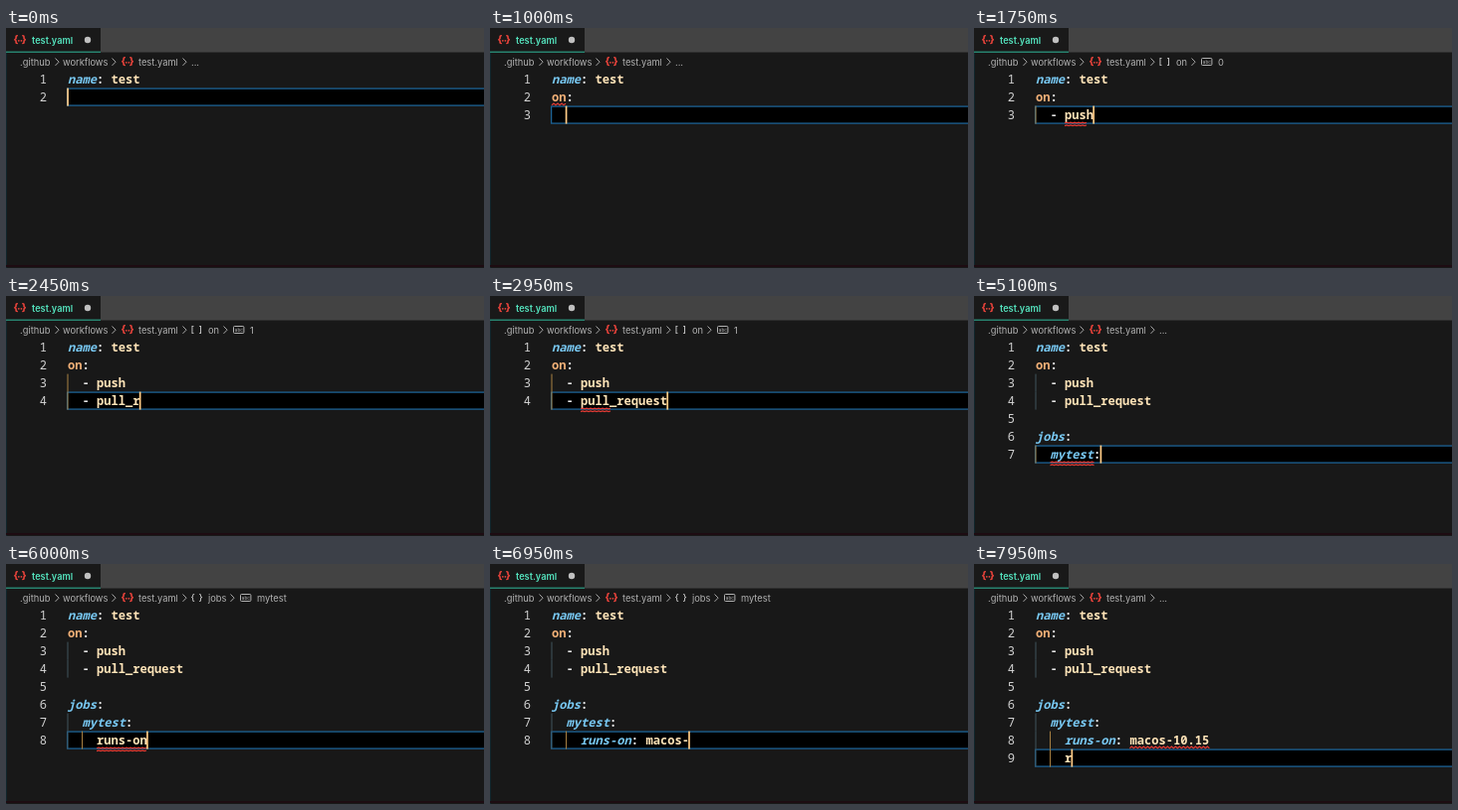
Write an HTML page that moves like this. It is 480 px wide and 242 px high and loops after 8000 ms.

```html
<!DOCTYPE html>
<html lang="en">
<head>
<meta charset="utf-8">
<title>Typing a workflow file</title>
<style>
  html, body { margin: 0; width: 100%; height: 100%; overflow: hidden; background: #181818; }
  svg { display: block; width: 100vw; height: 100vh; }
  text { white-space: pre; }
  .code { font: 600 12.1px "Noto Sans Mono", monospace; }
  .ui { font: 9.3px Inter, sans-serif; fill: #b2b2b2; }
  .tab { font: 600 9.2px Inter, sans-serif; fill: #55e6c0; }
  .bracket { font: 500 9.6px Inter, sans-serif; fill: #c4c4c4; }
  .icon { font: 800 10px Inter, sans-serif; fill: #e8433b; }
  .key { font-style: italic; fill: #78c8f2; }
  .bool { fill: #f2b077; }
  .value { fill: #ffe4b8; }
  .mark { fill: #e8e8e8; }
  .number { font-weight: 500; fill: #d2d2d2; text-anchor: end; }
  .chevron, .wave, .box { fill: none; }
  .chevron { stroke: #a8a8a8; stroke-width: 1; }
  .wave { stroke: #e23b35; stroke-width: 1.2; }
  .box { stroke: #b2b2b2; stroke-width: 1; }
</style>
</head>
<body>
<svg viewBox="0 0 480 242">
  <rect width="480" height="242" fill="#181818"/>
  <rect width="480" height="24.5" fill="#434343"/>
  <rect width="95" height="24.5" fill="#191919"/>
  <rect y="23.6" width="95" height="1.2" fill="#2a9c83"/>
  <rect y="25" width="1" height="217" fill="#10252b"/>
  <rect y="239" width="480" height="2" fill="#1d0c12"/>
  <text class="tab" x="26" y="15.6">test.yaml</text>
  <circle cx="82" cy="12" r="3.2" fill="#c0c0c0"/>
  <g id="crumbs"></g>
  <g id="editor"></g>
</svg>
<script>
const LOOP = 8000, LEFT = 62, CHAR = 7.26, LINE = 18, TOP = 42.6;

// Typing bursts: first key time, time between keys, keys.
const bursts = [
  [350, 115, 'on:\n'],
  [1120, 118, '- push'],
  [1900, 68, '\n- pull_request'],
  [3110, 74, '\n\n\bjobs:\n'],
  [4420, 100, 'mytest:\n'],
  [5260, 102, 'runs-on'],
  [6130, 115, ': macos-10.15'],
  [7580, 0, '\n'],
  [7900, 0, 'r']
];
const keys = bursts.flatMap(([start, step, text]) =>
  [...text].map((key, i) => ({ time: start + i * step, key })));

// Error underlines: from, to, line, column, length, number of waves.
const errors = [
  [880, 1420, 2, 0, 2, 1],
  [1650, 2120, 3, 4, 3, 2],
  [2480, 3280, 4, 4, 4, 2],
  [3900, 4700, 6, 4, 1, 1],
  [4980, 5400, 7, 2, 6, 2],
  [5920, 6380, 8, 4, 7, 2],
  [7460, LOOP, 8, 13, 11, 1]
];

// Symbol path after the file name: time, parent brackets, parent, child.
const symbols = [
  [0], [1560, '[]', 'on', '0'], [2050], [2300, '[]', 'on', '1'],
  [3200], [5500, '{}', 'jobs', 'mytest'], [7680]
];

const lineTop = line => TOP + (line - 1) * LINE;
const columnX = column => LEFT + column * CHAR;
const indentOf = text => text.match(/^ */)[0].length;
const label = (type, x, y, text) => `<text class="${type}" x="${x}" y="${y}">${text}</text>`;
const rect = (x, y, w, h, fill) => `<rect x="${x}" y="${y}" width="${w}" height="${h}" fill="${fill}"/>`;
const chevron = x => `<path class="chevron" d="M${x - 2} 30.5l3.6 3.7l-3.6 3.7"/>`;

function fileIcon(x, y) {
  const dots = [4.8, 7.4].map(dx => `<circle cx="${x + dx}" cy="${y - 2.6}" r=".9" fill="#e8433b"/>`).join('');
  return label('icon', x - .4, y, '{') + dots + label('icon', x + 7.8, y, '}');
}

function typed(time) {
  const lines = ['name: test', ''];
  let lastKey = 0;
  for (const { time: at, key } of keys) {
    if (at > time) break;
    lastKey = at;
    const end = lines.length - 1, text = lines[end];
    if (key === '\n') {
      const indent = indentOf(text) + (text.endsWith(':') ? 2 : 0);
      lines[end] = text.trimEnd();
      lines.push(' '.repeat(indent));
    } else {
      lines[end] = key === '\b' ? text.slice(0, -2) : text + key;
    }
  }
  return { lines, lastKey };
}

function tokens(text) {
  const [, indent, dash, word, colon, value] = text.match(/^( *)(- ?)?([\w-]*)(:?)(.*)$/);
  const wordType = word === 'on' ? 'bool' : colon ? 'key' : 'value';
  return [[indent, ''], [dash || '', 'mark'], [word, wordType], [colon, 'mark'], [value, 'value']];
}

function codeLine(text, line) {
  const y = lineTop(line) + 13.2;
  let column = 0, out = label('code number', 41, y, line);
  for (const [part, type] of tokens(text)) {
    const shown = part.trimStart();
    if (shown) out += label('code ' + type, columnX(column + part.length - shown.length), y, shown);
    column += part.length;
  }
  return out;
}

function guides(lines) {
  const current = lines.length - 1, depth = indentOf(lines[current]);
  let first = current;
  while (first > 0 && indentOf(lines[first - 1]) >= depth) first--;
  return lines.map((text, i) => {
    let out = '';
    if (!text.trim()) return out;
    for (let column = 0; column < indentOf(text); column += 2) {
      const active = i >= first && column === depth - 2;
      out += rect(columnX(column) - .5, lineTop(i + 1), 1, LINE, active ? '#a98143' : '#41555c');
    }
    return out;
  }).join('');
}

function wave(line, column, length, count) {
  const steps = Math.round(length * CHAR / 2), height = count > 1 ? .6 : 1.7;
  let out = '';
  for (let n = 0; n < count; n++) {
    let d = `M${columnX(column)} ${lineTop(line) + LINE - .8 + n * 2.8}`;
    for (let i = 0; i < steps; i++) d += `l2 ${i % 2 ? height : -height}`;
    out += `<path class="wave" d="${d}"/>`;
  }
  return out;
}

function crumbs(time) {
  const [, brackets, parent, child] = symbols.filter(s => s[0] <= time).pop();
  let out = fileIcon(8, 15.4) + label('ui', 14, 37.6, '.github') + chevron(51.5)
    + label('ui', 57, 37.6, 'workflows') + chevron(108.5) + fileIcon(116, 37.4)
    + label('ui', 133, 37.6, 'test.yaml') + chevron(179.5);
  if (!brackets) return out + label('ui', 186, 37.6, '...');
  const split = parent === 'on' ? 220.5 : 227.5;
  return out + label('bracket', 185.6, 37.4, brackets[0]) + label('bracket', 193.6, 37.4, brackets[1])
    + label('ui', 203, 37.6, parent) + chevron(split)
    + `<rect class="box" x="${split + 8}" y="30.5" width="10.4" height="7" rx="1"/>`
    + `<text class="ui" style="font-size:4.6px" x="${split + 9.3}" y="35.6">abc</text>`
    + label('ui', split + 24.5, 37.6, child);
}

function editor(time) {
  const { lines, lastKey } = typed(time);
  const line = lines.length, top = lineTop(line);
  let out = `<rect x="61.6" y="${top + .5}" width="422" height="${LINE - 1}" fill="#000" stroke="#1c6294" stroke-width="1.3"/>`;
  out += guides(lines) + lines.map((text, i) => codeLine(text, i + 1)).join('');
  for (const [from, to, ...place] of errors) if (time >= from && time < to) out += wave(...place);
  if ((time - lastKey) % 1000 < 500) {
    out += rect(columnX(lines[line - 1].length) - .8, top, 1.7, LINE, '#ffcb85');
  }
  return out;
}

const crumbsGroup = document.getElementById('crumbs');
const editorGroup = document.getElementById('editor');
const start = performance.now();

function update(group, markup) {
  if (group.markup !== markup) group.innerHTML = group.markup = markup;
}

function draw() {
  const time = (performance.now() - start) % LOOP;
  update(crumbsGroup, crumbs(time));
  update(editorGroup, editor(time));
  requestAnimationFrame(draw);
}
draw();
</script>
</body>
</html>
```
